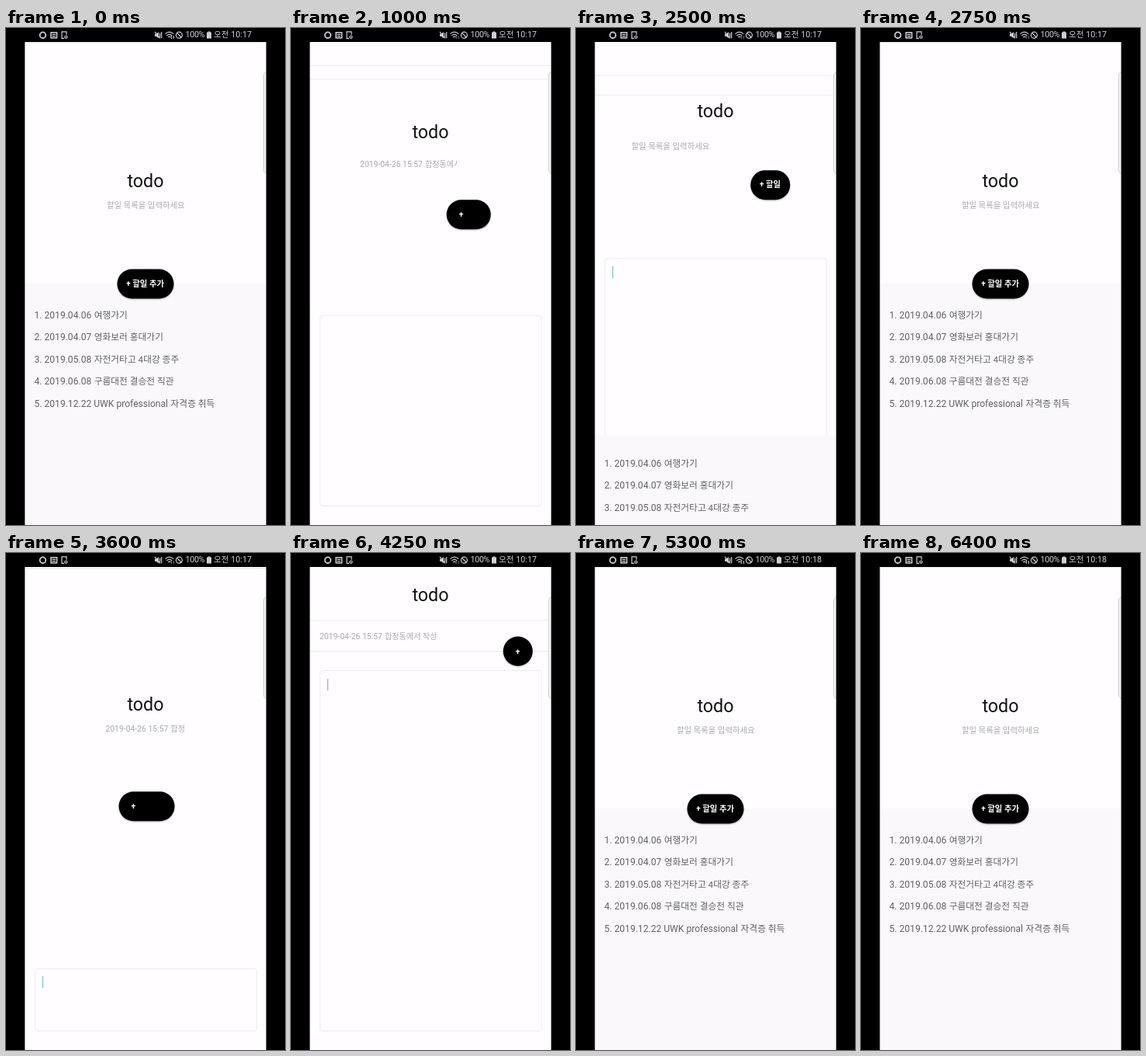
These frames come from a looping animation (360 by 640 pixels, 6500 ms). An HTML page:

```html
<!DOCTYPE html>
<html lang="ko">
<head>
<meta charset="utf-8">
<title>todo</title>
<style>
/* --p: 0 list view, 1 editor view; --e: 1 while the editor texts are shown */
@property --p { syntax: "<number>"; inherits: true; initial-value: 0; }
@property --e { syntax: "<number>"; inherits: true; initial-value: 0; }

html, body { margin: 0; width: 100%; height: 100%; overflow: hidden; background: #000; }
#app {
  position: relative; width: 360px; height: 640px; overflow: hidden;
  font-family: Roboto, "Noto Sans CJK KR", "Noto Sans CJK", sans-serif;
  white-space: nowrap;
  animation: move 6.5s infinite, mode 6.5s step-end infinite;
}
#app * { position: absolute; box-sizing: border-box; }
.idle { opacity: calc(1 - var(--e)); }
.edit { opacity: var(--e); }

#screen { left: 24px; top: 18px; width: 312px; height: 622px; background: #fffdff; overflow: hidden; }
#page { left: -24px; top: -18px; width: 360px; height: 640px; }
#edges { left: 24px; top: 18px; width: 312px; height: 622px; border: solid rgba(0, 0, 0, .32); border-width: 0 1px; }
.rule { left: 24px; top: 18px; width: 312px; height: 1px; background: #eeecf0; }
#r1 { transform: translateY(calc(var(--p) * 68px)); }
#r2 { transform: translateY(calc(var(--p) * 108px)); }

#box {
  left: 36.5px; width: 287px; bottom: 24.5px; height: calc(74.5px + var(--p) * 390px);
  border: 1px solid #eeecf0; border-radius: 4px;
}
#caret { left: 9.5px; top: 9.5px; width: 1px; height: 15px; background: #6fb9c3; animation: blink 6.5s step-end infinite; }

#panel { left: 24px; top: 329px; width: 312px; height: 320px; background: #faf8fb; transform: translateY(calc(var(--p) * 311px)); }
#list {
  left: 36.5px; top: 355.5px; margin: 0; padding: 0; list-style: none;
  font-size: 12.1px; line-height: 28.6px; color: #626266;
  transform: translateY(calc(var(--p) * 304px));
}
#list li, #app .ko { position: static; }
.ko { font-size: .97em; margin-left: .5px; }

#title {
  left: 24px; top: 182px; width: 312px; text-align: center;
  font-size: 23.3px; line-height: 30px; color: #111;
  transform: translateY(calc(var(--p) * -143px));
}
#sub {
  left: 0; top: 218.5px; height: 20px; width: calc(101px + var(--p) * 55px); overflow: hidden;
  font-size: 10.4px; line-height: 20px; color: #a9a9ac;
  transform: translate(calc(129.9px - var(--p) * 93px), calc(var(--p) * -121px));
}
#sub > span { left: 0; top: 0; }

#add {
  left: 0; top: 0; width: calc(73px - var(--p) * 35.5px); height: 37.5px;
  border-radius: 19px; background: #000; box-shadow: 0 1px 2px rgba(0, 0, 0, .3);
  color: #fff; font-size: 10.4px; font-weight: 700; line-height: 38.5px;
  transform: translate(calc(143.5px + var(--p) * 130.3px), calc(310.5px - var(--p) * 203px));
}
#label { left: 11.5px; right: 11px; top: 0; height: 37px; overflow: hidden; }
#label span { left: 0; top: 0; }
#plus { left: 0; width: 37.5px; text-align: center; line-height: 40px; }

#handle { left: 332px; top: 56px; width: 10px; height: 132px; border: 1px solid #d2d2d4; border-radius: 5px; background: #f4f4f5; }

#bar { left: 0; top: 0; width: 360px; height: 18px; background: #000; color: #cfcfcf; line-height: 18.6px; font-size: 10.7px; }
#bar svg { left: 0; top: 0; }
#pct { left: 231.5px; top: 0; letter-spacing: -.3px; }
.clock { left: 268px; top: 0; }
#t17 { animation: before 6.5s step-end infinite; }
#t18 { animation: after 6.5s step-end infinite; }
#link { animation: traffic 6.5s step-end infinite; }

@keyframes move {
  0%, 13.754% { --p: 0; animation-timing-function: cubic-bezier(.6, 0, .4, 1); }
  17.215%, 35.723% { --p: 1; animation-timing-function: cubic-bezier(.6, 0, .4, 1); }
  41.877%, 54.877% { --p: 0; animation-timing-function: cubic-bezier(.6, 0, .4, 1); }
  59.185%, 72.769% { --p: 1; animation-timing-function: cubic-bezier(.6, 0, .4, 1); }
  76.923%, 100% { --p: 0; }
}
@keyframes mode {
  0%, 34.615%, 71.538%, 100% { --e: 0; }
  10%, 53.846% { --e: 1; }
}
@keyframes blink {
  0%, 27.692%, 42.307%, 57.692%, 73.077%, 100% { opacity: 0; }
  16.923%, 34.615%, 50%, 65.385% { opacity: 1; }
}
@keyframes before { 0% { opacity: 1; } 66.923%, 100% { opacity: 0; } }
@keyframes after { 0% { opacity: 0; } 66.923%, 100% { opacity: 1; } }
@keyframes traffic {
  0%, 81.538%, 98.461%, 100% { opacity: .8; }
  6.154%, 83.077% { opacity: .45; }
}
</style>
</head>
<body>
<div id="app">
  <div id="screen"><div id="page">
    <div class="rule" id="r1"></div>
    <div class="rule" id="r2"></div>
    <div id="box"><div id="caret"></div></div>
    <div class="idle" id="panel"></div>
    <ul class="idle" id="list">
      <li>1. 2019.04.06 <span class="ko">여행가기</span></li>
      <li>2. 2019.04.07 <span class="ko">영화보러 홍대가기</span></li>
      <li>3. 2019.05.08 <span class="ko">자전거타고 4대강 종주</span></li>
      <li>4. 2019.06.08 <span class="ko">구름대전 결승전 직관</span></li>
      <li>5. 2019.12.22 UWK professional <span class="ko">자격증 취득</span></li>
    </ul>
    <div id="title">todo</div>
    <div id="sub">
      <span class="idle">할일 목록을 입력하세요</span>
      <span class="edit">2019-04-26 15:57 <span class="ko">합정동에서 작성</span></span>
    </div>
    <div id="add">
      <div id="label"><span class="idle">+ 할일 추가</span></div>
      <div class="edit" id="plus">+</div>
    </div>
    <div id="handle"></div>
  </div></div>
  <div id="edges"></div>

  <div id="bar">
    <svg width="360" height="18" fill="none" stroke="#cfcfcf" stroke-width="1.2">
      <circle cx="47.5" cy="9.2" r="3.8" stroke-width="1.8"/>
      <rect x="58" y="5.8" width="7.6" height="7" stroke-width="1.5"/>
      <path d="M59.5 8.3h4.6M59.5 10.6h4.6"/>
      <path d="M75 13.4h-3V4.8h6v4"/>
      <circle cx="77.4" cy="11.6" r="1.6"/>
      <path d="M192 7.5h2l3-2.6v8.4l-3-2.6h-2z" fill="#cfcfcf" stroke="none"/>
      <path d="M192 4.8l7 8.6M198.6 6.4v5.4M200.7 5v8.2"/>
      <path d="M205.4 7.6q5.4-5 10.8 0M207.3 9.8q3.5-3 7 0M209.2 11.8q1.6-1.2 3.2 0"/>
      <path id="link" d="M213.4 10v4M216.4 10v4" stroke-width="1.4"/>
      <circle cx="223.4" cy="9.2" r="4"/>
      <path d="M220.6 6.4l5.6 5.6"/>
      <path d="M259 5.6h1.6V4.4h2.8v1.2h1.6v8h-6z" fill="#cfcfcf" stroke="none"/>
    </svg>
    <span id="pct">100%</span>
    <span class="clock" id="t17">오전 10:17</span>
    <span class="clock" id="t18">오전 10:18</span>
  </div>
</div>
</body>
</html>
```
